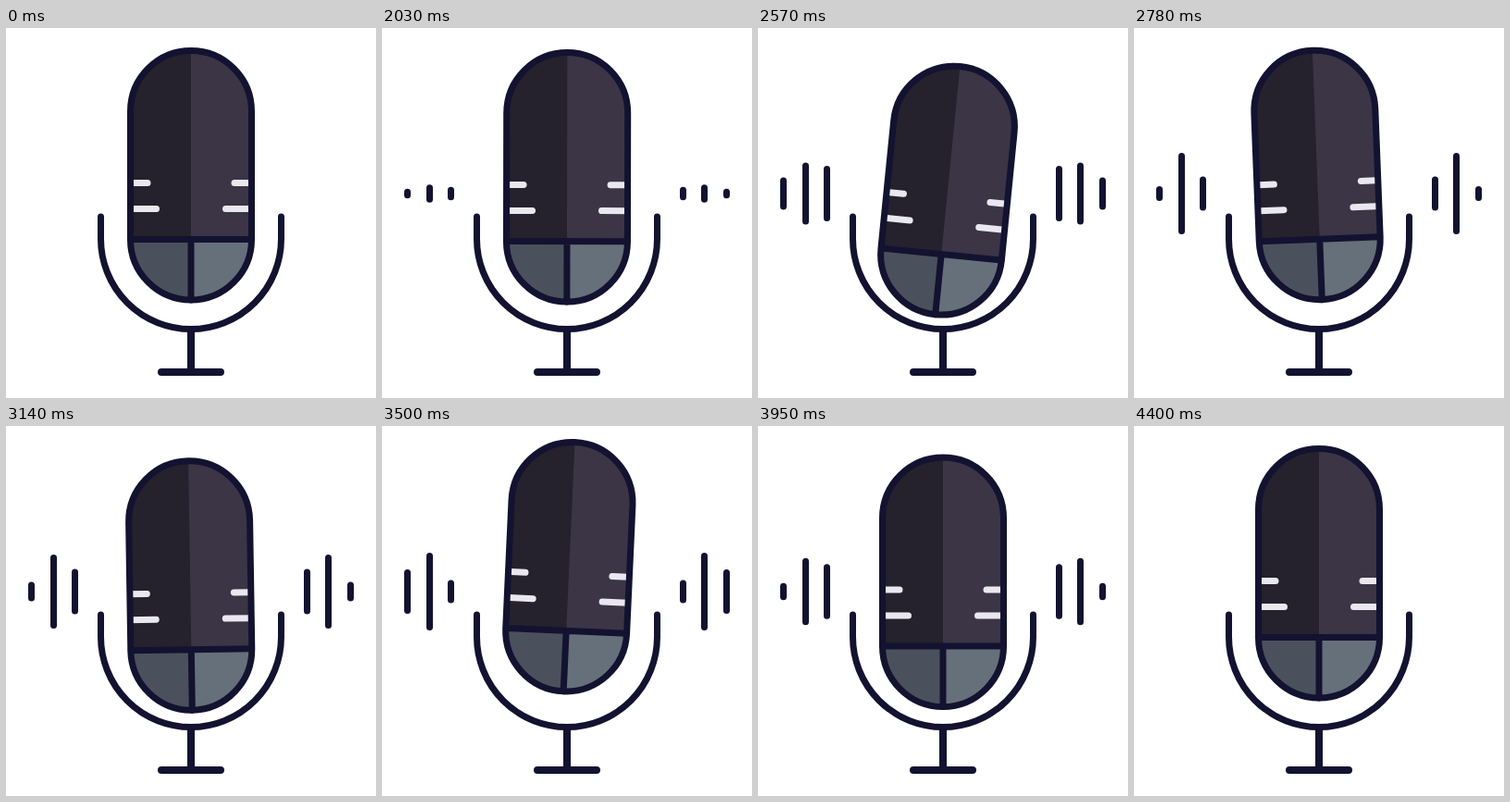
An HTML page for the animation above (4430 ms loop, 400x400 px).

```html
<!DOCTYPE html>
<html lang="en">
<head>
<meta charset="utf-8">
<title>Microphone</title>
<style>
  html, body { margin: 0; width: 100%; height: 100%; overflow: hidden; background: #fff; }
  svg { display: block; width: 100%; height: 100%; }
  .line { fill: none; stroke: #131230; stroke-width: 7; stroke-linecap: round; stroke-linejoin: round; }
  .thick { stroke-width: 8; }
  .shine { fill: none; stroke: #e9e7ef; stroke-width: 7; stroke-linecap: round; }
</style>
</head>
<body>
<svg viewBox="0 0 400 400">
  <clipPath id="capsule"><rect x="134.5" y="24.5" width="131" height="269.5" rx="65.5"/></clipPath>
  <path class="line" d="M102.5 204V228A97.5 97.5 0 0 0 297.5 228V204"/>
  <path class="line thick" d="M200 326V372M168 372H232"/>
  <path id="bars" class="line"/>
  <g id="mic">
    <g clip-path="url(#capsule)">
      <path fill="#25212d" d="M130 20H270V229H130Z"/>
      <path fill="#3b3546" d="M200 20H270V229H200Z"/>
      <path fill="#4a515c" d="M130 229H270V300H130Z"/>
      <path fill="#66707a" d="M200 229H270V300H200Z"/>
      <path class="shine" d="M130 167.5H153M130 195.5H162.5M270 167.5H247M270 195.5H237.5"/>
    </g>
    <rect class="line" x="134.5" y="24.5" width="131" height="269.5" rx="65.5"/>
    <path class="line" d="M135 228.5H265M200 228.5V294"/>
  </g>
</svg>
<script>
  const LOOP = 4430, REST = 2000, STEP = 30, STEPS = 80, RAMP = 6.5, MID_STEP = 31, MID_Y = 179;

  // Turning points as [step, value]; the drop starts at full speed, halfway through its first swing
  const drop = [[-15, -19.7], [15, 19.7], [32.5, -9], [40.5, 19.5], [52, -9.2], [65.5, 9.6], [77, 0]];
  const tilt = [[0, 0], [14, 8], [33.4, -7], [42, 4], [62, 0]];

  // Each bar pulses around its mean length with its own period
  const bars = [
    { x: 125.5, mean: 32.7, swing: -21.3, period: 21.8 },
    { x: 148.5, mean: 76, swing: 16.3, period: 25 },
    { x: 172.5, mean: 22.4, swing: -18.9, period: 40 }
  ];

  const mic = document.getElementById('mic');
  const barPath = document.getElementById('bars');

  function easeThrough(keys, step) {
    const next = keys.findIndex(([keyStep]) => keyStep > step);
    if (next < 0) return keys.at(-1)[1];
    const [s0, v0] = keys[next - 1], [s1, v1] = keys[next];
    return v0 + (v1 - v0) * (1 - Math.cos(Math.PI * (step - s0) / (s1 - s0))) / 2;
  }

  function drawBars(step) {
    const strength = Math.min(1, step / RAMP, (STEPS - step) / RAMP);
    barPath.setAttribute('d', strength <= 0 ? '' : bars.map(({ x, mean, swing, period }) => {
      const wave = Math.cos(2 * Math.PI * (step - MID_STEP) / period);
      const length = strength * (mean + swing * wave), top = MID_Y - length / 2;
      return `M${200 - x} ${top}v${length}M${200 + x} ${top}v${length}`;
    }).join(''));
  }

  function draw(time) {
    const step = Math.floor(Math.max(0, time % LOOP - REST) / STEP);
    mic.setAttribute('transform',
      `translate(0 ${easeThrough(drop, step)}) rotate(${easeThrough(tilt, step)} 200 210)`);
    drawBars(step);
  }

  const start = performance.now();
  function tick() {
    draw(performance.now() - start);
    requestAnimationFrame(tick);
  }
  tick();
</script>
</body>
</html>
```
